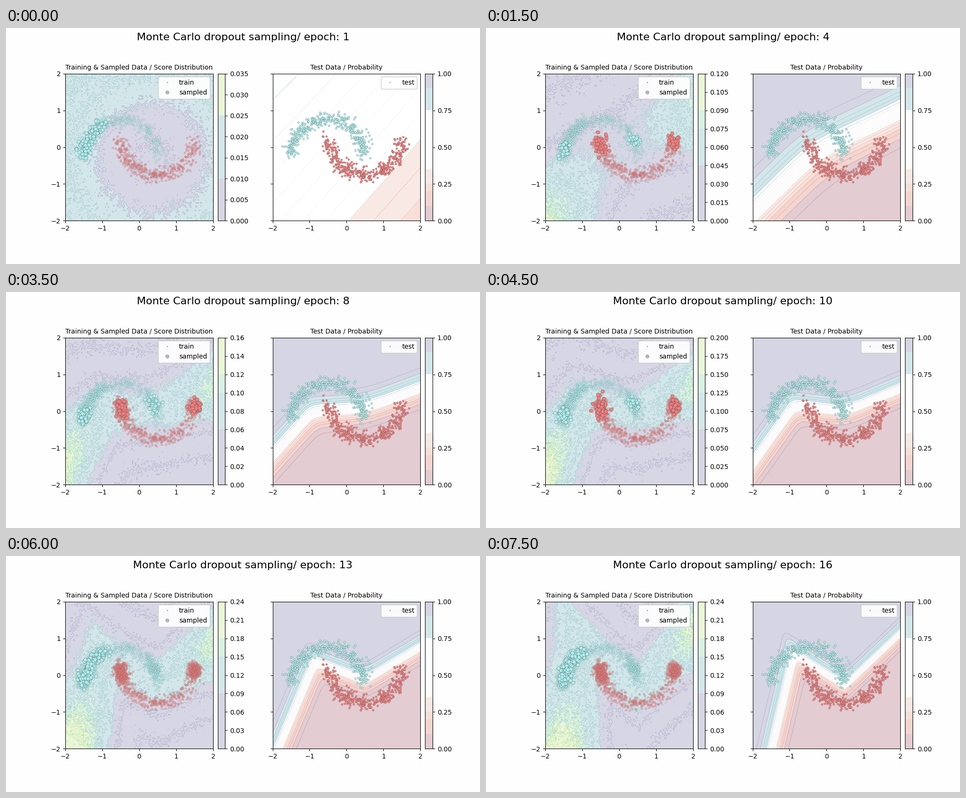
Animation of 1000x500 px, one loop 8 s. Source, as a matplotlib script:

```python
import numpy as np
import matplotlib.pyplot as plt
from matplotlib.animation import FuncAnimation
from matplotlib.colors import to_rgb
from matplotlib.lines import Line2D

EPOCHS = 16
CYAN, RED, GREY = "#afeeee", "#f08080", "#b2b2b6"
SIDE, BAR = 311.9, 15.6

fig = plt.figure(figsize=(10, 5), dpi=100, facecolor="#fefefe")


def add_axes(left, width):
    return fig.add_axes([left / 1000, (247.5 - SIDE / 2) / 500, width / 1000, SIDE / 500])


def add_pair(left):
    return add_axes(left, SIDE), add_axes(left + SIDE + 10, BAR)


ax_score, bar_score = add_pair(125)
ax_prob, bar_prob = add_pair(562.5)
title = fig.suptitle("", fontsize=16)

PX, PY = np.meshgrid(np.linspace(-2, 2, 160), np.linspace(-2, 2, 160))
SX, SY = np.meshgrid(np.linspace(-2, 2, 100), np.linspace(-2, 2, 100))

PROB_LEVELS = np.linspace(0, 1, 21)
PROB_FILL = (["#e3ccd2"] * 2 + ["#f4d5d0"] * 2 + ["#f9dfd8"] + ["#f8e9e4"] * 2
             + ["#ffffff"] * 8 + ["#d3e6ea"] * 3 + ["#d5d5e3"] * 2)
PROB_LINE = (["#c9a0ae"] * 2 + ["#e0aeaa"] * 2 + ["#eac0b6"] * 2 + ["#ead2cc"]
             + ["#f6f4f4"] * 5 + ["#f3e6e2", "#b7cfdf"] + ["#a3cbd4"] * 3
             + ["#b4b2cc"] * 2)
FILL = ["#d7d6e4", "#d3e6ea", "#d9f0e2", "#e9f6d8"]
LINE = ["#b3b0cc", "#9fcbd0", "#a5d8bc", "#cde3a0"]


def shade(frac, colors):
    return colors[int(np.searchsorted([.335, .665, .75], frac))]


def warmup(epoch):
    return min(1, (epoch - 1) / 3)


def soft_max(a, b, t=.4):
    return t * np.logaddexp(a / t, b / t)


def soft_min(a, b, t=.4):
    return -soft_max(-a, -b, t)


def logit(epoch, x, y):
    """Untrained slope blending into three soft-joined planes."""
    start = soft_min(.3 * y - .34 * x, .19 * (y - x) + .23, .08)
    e = max(epoch, 4)
    gain = 6.4 * (1 - np.exp(-(e / 5.5) ** 1.4))
    m_left = 1 + 3.3 * ((e - 4) / 12) ** 3
    m_mid = .73 - .085 * e
    m_right = .38 + .57 * ((e - 8) / 8) ** 2
    valley = .15 - .45 * ((e - 3) / 13) ** 1.5
    left_y = -.84 * np.exp((4 - e) / 2)
    left = 1.1 * gain / np.hypot(1, m_left) * (y - left_y - m_left * (x + 1))
    mid = gain * (y - valley - m_mid * (x - .5))
    right = gain * (y - valley - m_right * (x - .5))
    t = warmup(epoch)
    return (1 - t) * start + t * soft_max(left, soft_min(mid, right))


def score(epoch, top):
    """Noisy uncertainty: rings at first, then a band on the boundary."""
    rings = .004 + .0033 * np.hypot(SX - .35, SY + .3) ** 1.5
    grow = 1 - np.exp(-epoch / 3)
    reach = (SX ** 2 + SY ** 2) / 8
    far = 1.08 - .04 * np.tanh(SX * 4)
    amp = top * grow * (.42 + (far - .42) * reach)
    z = logit(epoch, SX, SY)
    band = amp / (1 + np.abs(z / (3 + .2 * epoch)) ** 2.5) + .003
    t = warmup(epoch)
    noise = np.random.default_rng(100 + epoch).normal(0, .12, SX.shape)
    return np.clip(((1 - t) * rings + t * band) * (1 + noise), 1e-4, top * .995)


# Two moons data
rng = np.random.default_rng(7)


def moon(cls, lo, hi, n, noise=.1):
    a = rng.uniform(lo, hi, n)
    if cls == 0:
        pts = np.c_[np.cos(a) - .5, np.sin(a) - .25]
    else:
        pts = np.c_[.5 - np.cos(a), .25 - np.sin(a)]
    return pts + rng.normal(0, noise, pts.shape)


def cloud(arcs, noise=.1):
    pts = np.concatenate([moon(*arc, noise) for arc in arcs])
    cols = np.concatenate([[(CYAN, RED)[arc[0]]] * arc[3] for arc in arcs])
    return pts, cols


def queried(epoch):
    """Arcs (class, angle range, count) sampled at an epoch."""
    if 3 <= epoch <= 11:
        arcs = [(0, 2.85, np.pi, 35), (0, .3, .6, 22),
                (1, 0, .4, 50), (1, 2.92, np.pi, 35)]
    else:
        arcs = [(0, 2.05, np.pi, 130)]
    return cloud(arcs, .085)


MOONS = [(0, 0, np.pi, 400), (1, 0, np.pi, 400)]
TEST, TRAIN = cloud(MOONS), cloud(MOONS)
SAMPLES = [queried(e) for e in range(1, EPOCHS + 1)]


def dots(ax, data, size, alpha, lw):
    pts, cols = data
    ax.scatter(pts[:, 0], pts[:, 1], s=size, c=list(cols), alpha=alpha,
               edgecolors="#404040", linewidths=lw, zorder=3)


def legend(ax, entries):
    marks = [Line2D([], [], ls="", marker="o", ms=ms, color=GREY, mew=0, label=name)
             for name, ms in entries]
    ax.legend(handles=marks, loc="upper right", numpoints=1, framealpha=.93)


def frame_axes(ax, name):
    ax.set(xlim=(-2, 2), ylim=(-2, 2), xticks=range(-2, 3), yticks=range(-2, 3))
    ax.set_title(name, fontsize=10)


def contours(ax, x, y, z, levels, fills, lines):
    ax.clear()
    ax.contourf(x, y, z, levels=levels, colors=fills)
    ax.contour(x, y, z, levels=levels[1:-1], colors=lines, linewidths=.6)


def color_bar(ax, fills, ticks, digits):
    ax.clear()
    top = ticks[-1]
    rgb = np.array([[to_rgb(c)] for c in fills])
    ax.imshow(rgb, origin="lower", extent=(0, 1, 0, top), aspect="auto",
              interpolation="nearest")
    ax.set_xticks([])
    ax.yaxis.tick_right()
    ax.set_yticks(ticks, [f"{t:.{digits}f}" for t in ticks])
    ax.set_ylim(0, top)


def draw_score(epoch):
    unit = min(6, round(.7 + .47 * epoch))
    n = 8 if epoch > 1 else 7
    levels = .005 * unit * np.arange(n + 1)
    fills = [shade((i + .5) / n, FILL) for i in range(n)]
    lines = [shade(i / n, LINE) for i in range(1, n)]
    contours(ax_score, SX, SY, score(epoch, levels[-1]), levels, fills, lines)
    old = [TRAIN] + SAMPLES[:epoch - 1]
    train = [np.concatenate(part) for part in zip(*old)]
    dots(ax_score, train, 10, .45, .2)
    dots(ax_score, SAMPLES[epoch - 1], 30, 1, .25)
    legend(ax_score, [("train", 2.2), ("sampled", 6)])
    frame_axes(ax_score, "Training & Sampled Data / Score Distribution")
    color_bar(bar_score, fills, levels, 3 if unit < 4 or unit % 2 else 2)


def draw_prob(epoch):
    p = 1 / (1 + np.exp(-logit(epoch, PX, PY)))
    contours(ax_prob, PX, PY, p, PROB_LEVELS, PROB_FILL, PROB_LINE)
    dots(ax_prob, TEST, 9, 1, .2)
    legend(ax_prob, [("test", 2.2)])
    frame_axes(ax_prob, "Test Data / Probability")
    ax_prob.tick_params(labelleft=False)
    color_bar(bar_prob, PROB_FILL, np.linspace(0, 1, 5), 2)


def draw(i):
    epoch = i + 1
    title.set_text(f"Monte Carlo dropout sampling/ epoch: {epoch}")
    draw_score(epoch)
    draw_prob(epoch)
    return []


anim = FuncAnimation(fig, draw, frames=EPOCHS, interval=500, repeat=True,
                     repeat_delay=0, blit=False)
plt.show()
```
